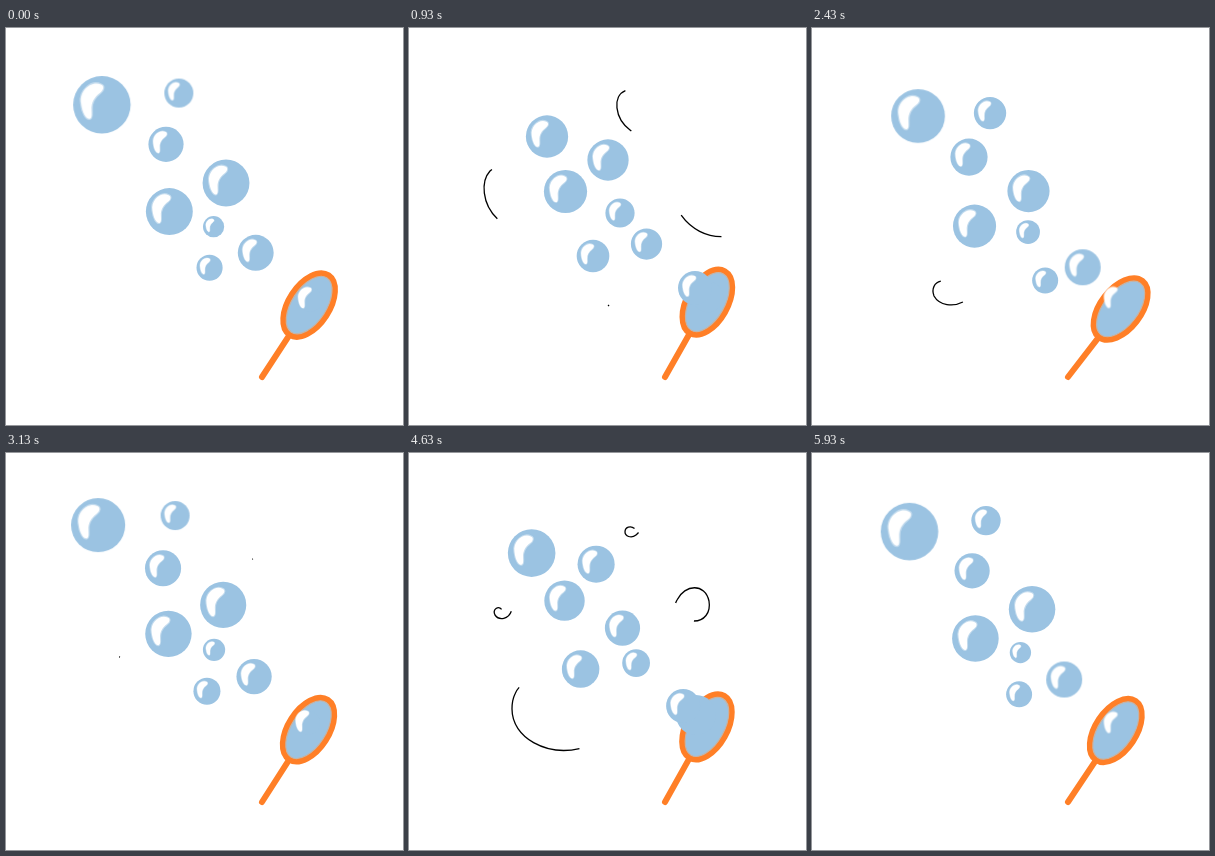
An HTML page without scripts that plays this animation: 397 by 397 pixels, repeating every 6.01 s.

```html
<!DOCTYPE html>
<html lang="en">
<head>
<meta charset="utf-8">
<title>Bubble wand</title>
<style>
html, body { margin: 0; width: 100%; height: 100%; overflow: hidden; background: #fff; }
svg { display: block; width: 100%; height: 100%; }

.bubble, .popA, .popB, .bud, .puff, .wand, .seed, .disc, .neck, .wind path {
  animation: 3.005s linear -.02s infinite;
}
.film { fill: #9bc3e2; }
.shine { fill: #fff; stroke: #fff; stroke-opacity: .4; stroke-width: .9; }

/* each bubble drifts through five stops while its radius goes from r to s */
.bubble { animation-name: drift, size; }
.bud { animation-name: drift, budSize; }
@keyframes drift {
  0% { translate: var(--a); }
  31.67% { translate: var(--b); }
  55% { translate: var(--c); }
  81.67% { translate: var(--d); }
  100% { translate: var(--e); }
}
@keyframes size { from { scale: var(--r); } to { scale: var(--s); } }
@keyframes budSize { 0%, 55% { scale: 1.7; } 81.67%, 100% { scale: 1.3; } }

.disc { animation-name: disc; }
@keyframes disc { 0%, 8% { r: 7px; } 30%, 100% { r: 10px; } }
.neck { animation-name: neck; }
@keyframes neck {
  0%, 18% { r: 0px; }
  31.67% { r: 9px; }
  55% { r: 11.8px; }
  61%, 100% { r: 0px; }
}

.puff { animation-name: puff; }
@keyframes puff {
  0%, 59.9% { transform: translate(295px, 256px) scale(0); }
  60% { transform: translate(295px, 256px) scale(1.4); }
  68% { transform: translate(286px, 249.8px) scale(1.8); }
  100% { transform: translate(250px, 225px) scale(1.8); }
}

.popA { animation-name: popA; }
@keyframes popA {
  0% { transform: translate(96.5px, 77.5px) scale(2.9); }
  5% { transform: translate(92px, 72px) scale(2.7); }
  11.5% { transform: translate(87px, 65px) scale(2.4); }
  11.6%, 100% { transform: translate(87px, 65px) scale(0); }
}
.popB { animation-name: popB; }
@keyframes popB {
  0% { transform: translate(173.5px, 65.5px) scale(1.45); }
  5% { transform: translate(169px, 62.5px) scale(1.45); }
  22.8% { transform: translate(158px, 45px) scale(1); }
  22.9%, 100% { transform: translate(158px, 45px) scale(0); }
}

.wand { animation-name: swing; }
@keyframes swing {
  0%, 100% { rotate: 33.3deg; }
  23% { rotate: 30.6deg; }
  31.67% { rotate: 29.5deg; }
  45% { rotate: 28.9deg; }
  55% { rotate: 29.2deg; }
  64.5% { rotate: 33.3deg; }
  73.3% { rotate: 37.2deg; }
  77% { rotate: 39deg; }
  81.67% { rotate: 37.7deg; }
}
.seed { animation-name: seed; }
@keyframes seed { 0%, 66% { opacity: 0; } 72%, 100% { opacity: 1; } }

/* dash length, then how far its tail has run along the curl */
.wind path { fill: none; stroke: #000; stroke-width: 1.3; stroke-dasharray: 0 200; }
.wind .curl { animation-name: curl; }
@keyframes curl {
  0%, 4.5% { stroke-dasharray: 0 200; stroke-dashoffset: 0; }
  18% { stroke-dasharray: 22 200; stroke-dashoffset: 0; }
  31.67% { stroke-dasharray: 36 200; stroke-dashoffset: -19; }
  55% { stroke-dasharray: 22 200; stroke-dashoffset: -78; }
  63%, 100% { stroke-dasharray: 0 200; stroke-dashoffset: -100; }
}
.wind .loop { animation-name: loop; }
@keyframes loop {
  0%, 18% { stroke-dasharray: 0 200; stroke-dashoffset: 0; }
  31.67% { stroke-dasharray: 25 200; stroke-dashoffset: -4; }
  55% { stroke-dasharray: 40 200; stroke-dashoffset: -50; }
  70%, 100% { stroke-dasharray: 0 200; stroke-dashoffset: -100; }
}
.wind .sweep { animation-name: sweep; }
@keyframes sweep {
  0%, 31% { stroke-dasharray: 0 200; stroke-dashoffset: 0; }
  31.67% { stroke-dasharray: .5 200; stroke-dashoffset: 0; }
  55% { stroke-dasharray: 38 200; stroke-dashoffset: -12; }
  81.67% { stroke-dasharray: 17 200; stroke-dashoffset: -81; }
  90%, 100% { stroke-dasharray: 0 200; stroke-dashoffset: -100; }
}
</style>
</head>
<body>
<svg viewBox="0 0 397 397">
  <defs>
    <path id="shine" class="shine" d="M-.3-7C-3.5-8.6-8-5-7.2-.5C-6.8 3-5.4 5-4.3 4.9C-3.3 4.7-3.6 3-3.6 1.8C-3.8-.8-2.5-2.8-.6-4.2C.8-5.2.8-6.6-.3-7Z"/>
    <g id="ball"><circle class="film" r="10"/><use href="#shine"/></g>
  </defs>

  <g class="wind">
    <path class="curl" pathLength="100" d="M114 204C106 202 98 199 92 194C73 179 71 154 81 143C92 133 104 142 103 155C102 165 91 169 86 162C83 156 90 152 93 157"/>
    <path class="curl" pathLength="100" d="M247 106C238 109 228 108 221 102C205 90 203 66 218 62C230 59 239 72 227 82C222 86 216 83 216 79C216 74 222 72 226 76"/>
    <path class="loop" pathLength="100" d="M320 208C303 211 284 204 272 187C263 173 262 158 268 147C276 131 296 130 300 148C302 160 295 168 285 168C277 167 274 158 280 153"/>
    <path class="sweep" pathLength="100" d="M200 277C193 285 184 292 173 295C140 304 103 286 103 256C103 250 104 245 106 241C113 222 150 218 160 245C163 257 161 266 154 272C145 279 128 279 122 268C119 260 123 254 130 253L135 255"/>
  </g>

  <g transform="translate(256 349)">
    <g class="wand">
      <path d="M0 0V-50" stroke="#ff7f27" stroke-width="6" stroke-linecap="round"/>
      <ellipse class="film" cy="-86" rx="20.3" ry="35.5" stroke="#ff7f27" stroke-width="6"/>
      <ellipse cy="-86" rx="17.2" ry="32.4" fill="none" stroke="#c4b4a8" stroke-width="1.2"/>
    </g>
  </g>
  <g class="seed"><use href="#shine" transform="translate(304.5 271.5) scale(1.7)"/></g>

  <use href="#ball" class="puff"/>
  <g class="bud" style="--a:305px 272px;--b:286px 260px;--c:274px 253px;--d:233px 252.5px;--e:204px 240px">
    <circle class="film neck" cx="7.6" cy="5.3" r="0"/>
    <circle class="film disc" r="7"/>
    <use href="#shine"/>
  </g>

  <use href="#ball" class="bubble" style="--r:1.3;--s:2.35;--a:204px 240px;--b:184px 228px;--c:171.5px 216px;--d:162.5px 198px;--e:163.5px 184px"/>
  <use href="#ball" class="bubble" style="--r:1.8;--s:1.05;--a:250px 225px;--b:237.5px 216px;--c:227px 210px;--d:216px 204px;--e:207.5px 199px"/>
  <use href="#ball" class="bubble" style="--r:2.35;--s:1.75;--a:163.5px 184px;--b:156.5px 163.5px;--c:155.5px 147.5px;--d:157px 129px;--e:160.5px 116.5px"/>
  <use href="#ball" class="bubble" style="--r:1.05;--s:2.35;--a:207.5px 199px;--b:211px 185px;--c:213.5px 175px;--d:216.5px 163px;--e:220.5px 155.5px"/>
  <use href="#ball" class="bubble" style="--r:2.35;--s:1.45;--a:220.5px 155.5px;--b:199px 132px;--c:187px 111px;--d:178px 85px;--e:173.5px 65.5px"/>
  <use href="#ball" class="bubble" style="--r:1.75;--s:2.9;--a:160.5px 116.5px;--b:138px 108.5px;--c:122.5px 100px;--d:106px 88px;--e:96.5px 77.5px"/>
  <use href="#ball" class="popA"/>
  <use href="#ball" class="popB"/>
</svg>
</body>
</html>
```
